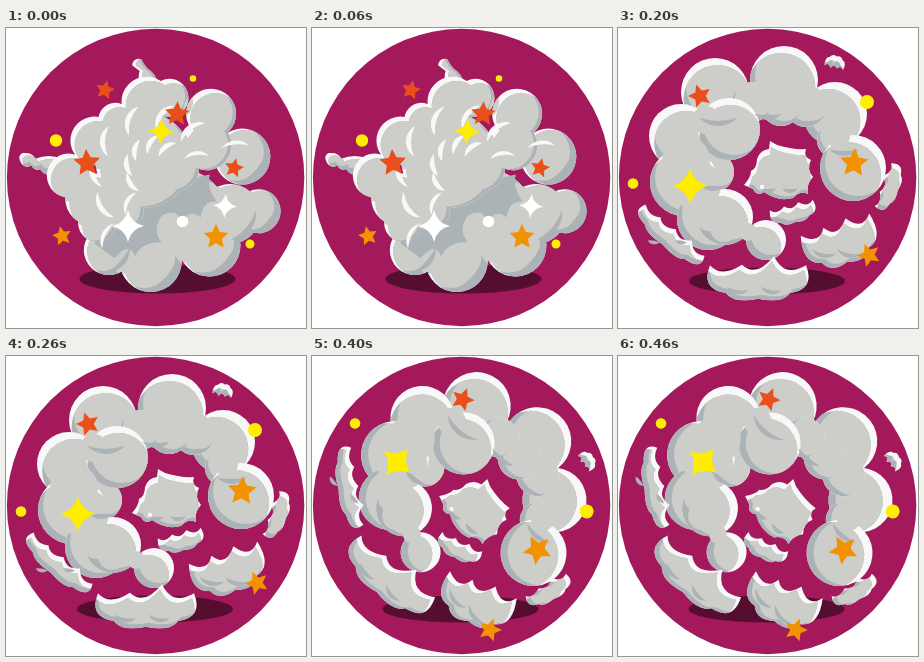
Write an HTML page with a canvas that moves like this. It is 300x300 px and loops after 500 ms.

```html
<!DOCTYPE html>
<html lang="en">
<head>
<meta charset="utf-8">
<title>Cartoon explosion</title>
<style>
html, body { margin: 0; width: 100%; height: 100%; overflow: hidden; background: #fff; }
canvas { display: block; width: 300px; height: 300px; }
</style>
</head>
<body>
<canvas id="stage" width="300" height="300"></canvas>
<script>
const ctx = document.getElementById('stage').getContext('2d');
const STEP = 100, MID = 150;
const WHITE = '#f8f8f8', GREY = '#cdcdc9', SHADE = '#abb3b6', DARK = '#560e30',
      PLUM = '#a3195b', RED = '#ea4e1b', ORANGE = '#f39200', YELLOW = '#ffed00';
const rad = deg => deg * Math.PI / 180;

function seeded(seed) {
  return () => (seed = (seed * 16807) % 2147483647) / 2147483647;
}

function fill(path, color) {
  ctx.fillStyle = color;
  ctx.fill(path);
}

function moved(path, x, y, turn = 0) {
  const p = new Path2D();
  p.addPath(path, new DOMMatrix().translate(x, y).rotate(turn));
  return p;
}

// Draws a scene turned about the middle of the stage.
function spin(deg, draw) {
  ctx.save();
  ctx.translate(MID, MID);
  ctx.rotate(rad(deg));
  ctx.translate(-MID, -MID);
  draw();
  ctx.restore();
}

function blob(...circles) {
  const p = new Path2D();
  for (const [x, y, r] of circles) {
    p.moveTo(x + r, y);
    p.arc(x, y, r, 0, 7);
  }
  return p;
}

const dots = (color, ...circles) => fill(blob(...circles), color);

// Smoke: light rim on one side, shaded rim on the other.
function puff(path, hx, hy, sx, sy) {
  ctx.save();
  fill(path, WHITE);
  ctx.clip(path);
  const body = moved(path, hx, hy);
  fill(body, SHADE);
  ctx.clip(body);
  fill(moved(path, sx, sy), GREY);
  ctx.restore();
}

// Tapered arc around a lobe.
function curl(color, x, y, r, mid, span, w) {
  const a = rad(mid), s = rad(span), c = 2 * (r - w) - r * Math.cos(s);
  const p = new Path2D();
  p.arc(x, y, r, a - s, a + s);
  p.quadraticCurveTo(x + c * Math.cos(a), y + c * Math.sin(a),
    x + r * Math.cos(a - s), y + r * Math.sin(a - s));
  fill(p, color);
}

// An arch of light curls.
function arch(x, y, reach, count, r) {
  for (let i = 0; i < count; i++) {
    const deg = 185 + 170 * i / (count - 1), a = rad(deg);
    curl(WHITE, x + reach * Math.cos(a), y + reach * Math.sin(a), r, (deg - 90) / 2 + 180 - 45, 58, 5);
  }
}

function star(color, x, y, r, turn) {
  const p = new Path2D();
  for (let i = 0; i < 10; i++) {
    const a = rad(turn - 90 + i * 36), d = i % 2 ? r * .48 : r;
    p.lineTo(x + d * Math.cos(a), y + d * Math.sin(a));
  }
  fill(p, color);
}

function spark(color, x, y, r, turn = 0, pinch = .25) {
  const p = new Path2D();
  const at = (deg, d) => [x + d * Math.cos(rad(deg + turn)), y + d * Math.sin(rad(deg + turn))];
  p.moveTo(...at(0, r));
  for (let a = 0; a < 360; a += 90) p.quadraticCurveTo(...at(a + 45, r * pinch), ...at(a + 90, r));
  fill(p, color);
}

function ground(x, y, ry) {
  ctx.fillStyle = '#fff';
  ctx.fillRect(0, 0, 300, 300);
  dots(PLUM, [149.6, 149.5, 148.7]);
  const p = new Path2D();
  p.ellipse(x, y, 78, ry, 0, 0, 7);
  fill(p, DARK);
}

// Torn scrap: ragged on top, scalloped below, then turned.
function scrap(x, y, w, h, turn, peaks = 3) {
  const rnd = seeded(Math.round(x * 31 + y)), p = new Path2D();
  p.moveTo(-w / 2, -h * .3);
  for (let i = 1; i <= peaks; i++) {
    const px = w * (i / peaks - .5), tip = i < peaks ? -h * (.3 + .2 * rnd()) : -h * .3;
    p.quadraticCurveTo(px - w / peaks * (.3 + .4 * rnd()), -h * .02, px, tip);
  }
  const bumps = 4, rim = (a, k) => [w / 2 * k * Math.cos(a), h * .45 * k * Math.sin(a)];
  for (let i = 1; i <= bumps; i++) {
    const a = Math.PI * i / bumps;
    p.quadraticCurveTo(...rim(a - Math.PI / bumps / 2, 1.3), ...(i < bumps ? rim(a, .95) : [-w / 2, -h * .3]));
  }
  puff(moved(p, x, y, turn), -2, 5, 3, -4);
  if (w > 60) for (const side of [-.2, .15]) curl(SHADE, x + w * side, y + h * .05, h * .28, 100, 55, 4);
}

// Flying lump: round lobes outside, shards pointing at the middle.
function lump(...lobes) {
  const mean = k => lobes.reduce((sum, l) => sum + l[k], 0) / lobes.length;
  const x = mean(0), y = mean(1), size = mean(2) * 1.55;
  const face = Math.atan2(MID - y, MID - x), rnd = seeded(Math.round(x * 17 + y));
  const p = blob(...lobes);
  p.moveTo(x, y);
  for (let i = -4; i <= 4; i++) {
    const d = size * (i % 2 ? 1 + .15 * rnd() : .75), a = face + i * .3;
    p.lineTo(x + d * Math.cos(a), y + d * Math.sin(a));
  }
  p.closePath();
  puff(p, -1, 4.5, 3, -4);
  lobes.forEach(([lx, ly, r], i) => {
    if (i % 2) curl(SHADE, lx, ly, r * .8, 110, 50, 4);
    else curl(WHITE, lx + r * .3, ly + r * .3, r * .7, -100, 50, 3);
  });
}

function chip(x, y, r) {
  const p = new Path2D(), rnd = seeded(x * 7 + y);
  for (let i = 0; i < 7; i++) {
    const a = i * .9, d = r * (.8 + .4 * rnd());
    p.lineTo(x + d * Math.cos(a), y + d * Math.sin(a));
  }
  puff(p, -1, 2, 1, -1.5);
}

function cloud() {
  puff(new Path2D('M48 60Q49 52 55 53Q64 58 62 65Q76 68 84 80L76 96L64 90Q62 82 63 77Q54 76 55 68Q48 68 48 60Z'), 1, 4, 1, -4);
  curl(SHADE, 70, 78, 10, 130, 70, 7);
  puff(new Path2D('M195 44Q201 38 206 44Q205 51 206 56Q211 68 202 78L180 76Q180 66 189 66Q194 55 198 53Z'), 3, 2, -2, 0);

  const low = [[233, 182, 28], [215, 236, 22], [190, 222, 30], [155, 236, 31], [98, 215, 31], [70, 182, 25]];
  puff(blob(...low, [150, 195, 45]), 2, 3, -3, -7);
  for (const [x, y, r] of low) curl(SHADE, x, y, r - 4, 75, 48, 5);
  fill(new Path2D('M62 168Q90 160 100 175L128 165Q135 176 145 172Q170 166 196 178Q186 186 186 204Q176 195 164 208Q160 194 144 200Q152 188 134 184Q116 190 118 206Q102 194 88 202Q92 186 70 192Z'), SHADE);

  const high = [[80, 98, 22], [121, 84, 24], [150, 79, 17], [186, 82, 25], [207, 92, 19], [232, 129, 25],
    [210, 152, 25], [85, 130, 26], [76, 153, 19], [105, 158, 20], [150, 128, 48], [172, 152, 24]];
  puff(blob(...high), 1, 6, -2, -3);
  arch(156, 142, 20, 5, 13);
  arch(155, 148, 52, 6, 18);
  for (const side of [-1, 1]) {
    curl(WHITE, 155 + side * 36, 164, 15, -90 + side * 30, 55, 4);
    curl(WHITE, 155 + side * 72, 180, 18, -90 + side * 30, 50, 4);
  }
}

const core = new Path2D('M-34 8Q-27 0 -27 -6Q-21 -9 -21 -18Q-18 -27 -9 -28L-8 -36L-1 -32Q15 -27 28 -28Q25 -20 33 -17Q28 -8 35 0Q28 7 30 17Q22 13 15 21Q0 25 -14 15Q-21 20 -25 12Z');

function ring() {
  // Upper lobes are lit from outside, lower ones from the right.
  const lobe = (x, y, r) => puff(blob([x, y, r]), y < 130 ? (130 - x) / 13 : -5, 7, 5, -5);
  const inner = (x, y, r) => puff(blob([x, y, r]), 0, 0, 3, -5);
  lobe(166, 52, 34);
  lobe(217, 86, 32);
  inner(188, 78, 21);
  inner(163, 77, 21);
  inner(217, 112, 18);
  lobe(235, 140, 33);
  lobe(97, 64, 34);
  inner(134, 74, 20);
  lobe(63, 108, 32);
  inner(96, 144, 20);
  lobe(66, 154, 34);
  lobe(111, 101, 31);
  lobe(90, 191, 31);
  lobe(107, 189, 28);
  lobe(148, 212, 20);
  dots(GREY, [68, 132, 24], [78, 157, 25], [92, 185, 18], [106, 200, 14], [88, 92, 14], [130, 204, 9], [220, 108, 12]);
  for (const [x, y, r] of [[100, 72, 26], [95, 146, 17], [150, 74, 18], [188, 78, 20], [226, 108, 20]])
    curl(SHADE, x, y, r, 90, 48, 5);

  puff(moved(core, 160, 149), 1, 6, 2, -3);
  for (const x of [150, 172]) curl(SHADE, x, 156, 9, 90, 60, 4);
  dots(WHITE, [144, 159, 2.2]);
  scrap(175, 184, 44, 24, -14);
  scrap(222, 212, 72, 54, -18);
  scrap(140, 251, 96, 46, 0);
  scrap(52, 208, 78, 26, 41, 4);
  scrap(271, 159, 46, 22, -69);
  scrap(217, 35, 19, 16, 195);

  star(RED, 82, 68, 12, -18);
  star(ORANGE, 236, 135, 15, 4);
  star(ORANGE, 251, 227, 12, -22);
  spark(YELLOW, 72, 158, 17, 0, .36);
  dots(YELLOW, [249, 74, 7], [15, 155.5, 5.3]);
}

const scenes = [
  () => {
    ground(151.5, 251, 14.5);
    spin(-35, cloud);
    star(RED, 99, 62, 10, 12);
    star(RED, 171, 86, 12.8, 3);
    star(RED, 81, 135, 14, -4);
    star(RED, 228, 140, 10, 12);
    star(ORANGE, 56, 208, 10, -12);
    star(ORANGE, 210, 209, 13, 0);
    spark(YELLOW, 155, 103.5, 13, 4);
    spark('#fff', 122, 198, 16);
    spark('#fff', 219, 178, 12, 4);
    dots('#fff', [176.5, 193.5, 5.8]);
    dots(YELLOW, [187, 50.5, 3.3], [50, 112.5, 6.2], [244, 216, 4.5]);
  },
  () => {
    ground(153, 255, 14.5);
    cloud();
    star(RED, 130, 44, 10.2, -8);
    star(RED, 224, 84, 12.8, 8);
    star(RED, 85, 125, 14, 32);
    star(RED, 193, 161, 10.2, 16);
    star(ORANGE, 41, 171, 10, -4);
    star(ORANGE, 204, 217, 13, 12);
    spark(YELLOW, 153, 95, 14, 10);
    spark('#fff', 115, 213, 18, 5);
    spark('#fff', 237, 181, 12, 10);
    dots('#fff', [162.5, 229, 5.6]);
    dots(YELLOW, [169, 49, 3.2], [42, 117.5, 6.3], [208, 191, 4.7], [237, 229.5, 4.7]);
  },
  () => {
    ground(149, 253, 13.5);
    ring();
  },
  () => {
    ground(152.5, 248, 16);
    lump([140, 37, 12], [122, 39, 13]);
    lump([186, 38, 12], [203, 38, 11]);
    lump([80, 66, 13], [91, 62, 10]);
    lump([128, 71, 15], [157, 62, 17], [171, 70, 11]);
    lump([221, 71, 16], [231, 81, 15]);
    lump([59, 106, 18], [46, 124, 19], [46, 149, 20]);
    lump([247, 120, 15], [256, 132, 17], [249, 146, 14]);
    lump([206, 124, 13], [198, 141, 20], [180, 120, 18], [157, 117, 20], [146, 118, 13]);
    lump([135, 182, 17], [150, 180, 15], [142, 153, 20], [120, 157, 17]);
    lump([88, 185, 16], [74, 189, 15], [72, 206, 14], [91, 217, 15]);
    lump([130, 232, 18], [160, 228, 19], [146, 242, 17]);
    lump([248, 188, 18], [240, 208, 16], [211, 212, 19]);
    chip(110, 100, 6.5);
    chip(104, 119, 3.5);
    chip(187, 87, 5);
    chip(217, 111, 5.5);
    chip(97, 159, 5.5);
    chip(180, 204, 6.5);
    chip(214, 155, 5);
    star(ORANGE, 102, 140, 12, 8);
    star(ORANGE, 198, 136, 12.3, 4);
    dots(YELLOW, [179.5, 185.5, 7]);
  },
  () => {
    ground(148.5, 253, 13.5);
    spin(40, ring);
  }
];

let shown = -1;
const start = performance.now();
function tick() {
  const i = Math.floor((performance.now() - start) / STEP) % scenes.length;
  if (i !== shown) scenes[shown = i]();
  requestAnimationFrame(tick);
}
tick();
</script>
</body>
</html>
```
